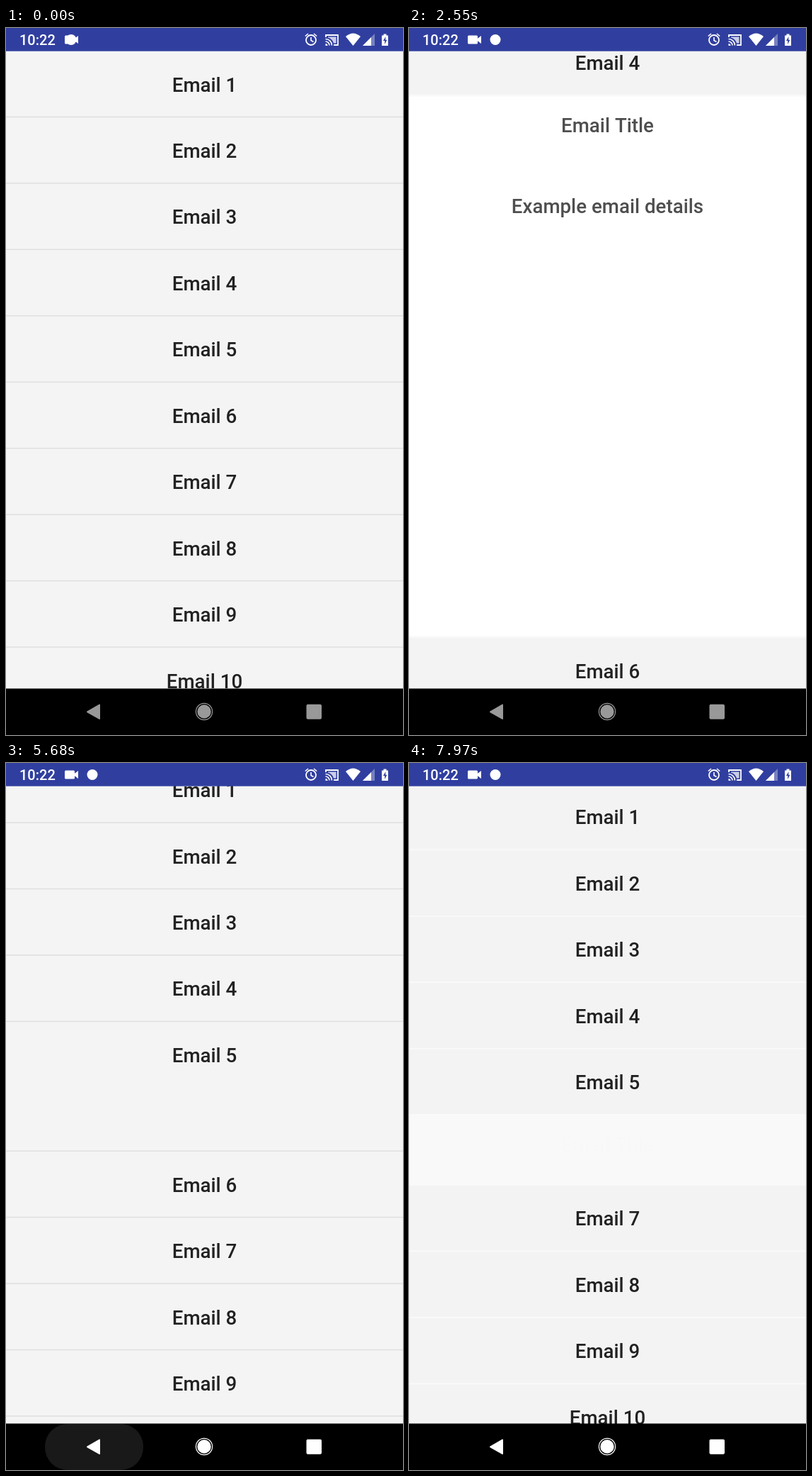
An HTML page with a canvas that plays this animation: 561 px wide and 997 px high, repeating every 8000 ms.

```html
<!DOCTYPE html>
<html lang="en">
<head>
<meta charset="utf-8">
<title>Expanding email list</title>
<style>
html, body { margin: 0; width: 100%; height: 100%; overflow: hidden; background: #000; }
canvas { display: block; }
</style>
</head>
<body>
<canvas id="stage" width="561" height="997"></canvas>
<script>
const ctx = document.getElementById('stage').getContext('2d');
const W = 561, H = 997, TOP = 32, BOTTOM = 932, NAV = 931.5, ROW = 93.45;
const LOOP = 8000, MOVE = 1640, OPEN_1 = 1648, CLOSE = 4668, OPEN_2 = 7883;
const FONT = 'Roboto, "Noto Sans", sans-serif';

const clamp = v => Math.max(0, Math.min(1, v));
const span = (t, from, to) => clamp((t - from) / (to - from));
const gray = v => `rgb(${v},${v},${v})`;

// cubic-bezier(.4, 0, .2, 1)
function ease(x) {
  if (x <= 0 || x >= 1) return clamp(x);
  let lo = 0, hi = 1, s;
  for (let i = 0; i < 24; i++) {
    s = (lo + hi) / 2;
    const bx = 1.2 * s * (1 - s) ** 2 + 0.6 * s * s * (1 - s) + s ** 3;
    if (bx < x) lo = s; else hi = s;
  }
  return s * s * (3 - 2 * s);
}

function rect(x, y, w, h, color) {
  ctx.fillStyle = color;
  ctx.fillRect(x, y, w, h);
}

function shape(d, color, stroke) {
  const path = new Path2D(d);
  if (stroke) {
    ctx.strokeStyle = color;
    ctx.lineWidth = stroke;
    ctx.stroke(path);
  } else {
    ctx.fillStyle = color;
    ctx.fill(path);
  }
}

function circle(x, y, r, color, stroke) {
  ctx.beginPath();
  ctx.arc(x, y, r, 0, 7);
  ctx.fillStyle = ctx.strokeStyle = color;
  ctx.lineWidth = stroke || 0;
  stroke ? ctx.stroke() : ctx.fill();
}

function pill(x, y, w, h, r, color) {
  ctx.beginPath();
  ctx.roundRect(x, y, w, h, r);
  ctx.fillStyle = color;
  ctx.fill();
}

function label(text, y, alpha = 1) {
  ctx.font = `500 27.7px ${FONT}`;
  ctx.textAlign = 'center';
  ctx.fillStyle = `rgba(33,33,33,${alpha})`;
  ctx.fillText(text, W / 2, y);
}

// Which row is open, how far, and in which direction
function stateAt(t) {
  if (t >= OPEN_2) return opening(t - OPEN_2, 5);
  if (t >= CLOSE + MOVE || t < OPEN_1) return { open: -1, p: 0 };
  if (t < CLOSE) return opening(t - OPEN_1, 4);
  return { open: 4, p: 1 - ease((t - CLOSE) / MOVE), closing: true, cover: span(t, CLOSE, CLOSE + 270) };
}

// The page trails the rows slightly
function opening(dt, open) {
  return { open, p: ease(dt / MOVE), page: ease((dt - 7) / MOVE), expanding: true };
}

function drawPage(top, bottom, fill, ink) {
  ctx.save();
  ctx.beginPath();
  ctx.rect(0, top, W, bottom - top);
  ctx.clip();
  rect(0, top, W, bottom - top, `rgba(255,255,255,${fill})`);
  label('Email Title', top + 51, ink);
  label('Example email details', top + 164.4, ink);
  ctx.restore();
}

function drawList(t) {
  const { open, p, page, expanding, closing, cover } = stateAt(t);
  const openTop = TOP + ROW * open, openEnd = openTop + ROW;
  const up = q => (TOP - openTop) * q;
  const down = q => (BOTTOM - openEnd) * q;

  ctx.save();
  ctx.beginPath();
  ctx.rect(0, TOP, W, BOTTOM - TOP);
  ctx.clip();
  rect(0, TOP, W, BOTTOM - TOP, expanding ? '#f9f9f9' : '#f4f4f4');

  for (let i = 0; i < 10; i++) {
    const shift = open < 0 ? 0 : i <= open ? up(p) : down(p);
    const y = TOP + ROW * i + shift;
    if (expanding) {
      if (i === open) continue;
      rect(0, y + 1, W, ROW - 2, '#f3f3f3');
      label('Email ' + (i + 1), y + 57.5);
      continue;
    }
    if (closing && i === open) {
      const end = openEnd + down(p);
      drawPage(y, end, 1, 1);
      ctx.globalAlpha = cover;
      rect(0, y, W, end - y, '#f4f4f4');
    }
    label('Email ' + (i + 1), y + 57.5);
    ctx.globalAlpha = 1;
    if (i) {
      const edge = closing && (i === open || i === open + 1);
      ctx.globalAlpha = edge ? clamp((0.74 - p) * 3) : 1;
      rect(0, y - 0.7, W, 1.4, '#dedede');
      ctx.globalAlpha = 1;
    }
  }
  if (expanding) {
    drawPage(openTop + up(page), openEnd + down(page), clamp(page * 5), page ** 1.2);
  }
  ctx.restore();
}

function drawStatus(t) {
  rect(0, 0, W, 32.7, '#303f9f');
  ctx.font = `500 20px ${FONT}`;
  ctx.textAlign = 'left';
  ctx.fillStyle = '#fff';
  ctx.fillText('10:22', 19, 24);

  // Recorder, with a second notification sliding out from it
  pill(83, 10.5, 14, 12, 1.5, '#fff');
  shape('M96 15.5L102 11V22L96 17.5Z', '#fff');
  circle(92 + 30 * ease(span(t, 60, 860)), 16.5, 7.5, '#fff');

  // Alarm
  circle(431, 17, 7, '#fff', 1.8);
  shape('M431 13V17.5L434.5 19.5M422.8 11.5L427 8M439.2 11.5L435 8', '#fff', 1.6);

  // Cast
  shape('M452 13V10H469V24H463', '#fff', 1.8);
  shape('M451.5 15.5A9 9 0 0 1 460.5 24.5M451.5 19A5.5 5.5 0 0 1 457 24.5', '#fff', 1.6);
  shape('M451.5 22A3 3 0 0 1 454.5 25H451.5Z', '#fff');
  shape('M455 12.5H466.5V21.5H463Q461 15 455 13.5Z', 'rgba(255,255,255,.75)');

  // Wi-Fi, signal and battery
  shape('M480 12Q490.5 3 501 12L490.5 25Z', '#fff');
  shape('M504 25L521 8V25Z', 'rgba(255,255,255,.35)');
  shape('M504 25L516 13V25Z', '#fff');
  shape('M531 10.5H533.5V8.5H537.5V10.5H540V25H531Z', '#fff');
  shape('M536.5 12L533 18H535.2V23L538.3 16.8H536.2Z', '#303f9f');
}

function drawNav(t) {
  rect(0, NAV, W, H - NAV, '#000');

  // Ripple behind the back button
  if (t > 4560 && t < 6400) {
    const grow = 1 - (1 - span(t, 4560, 5400)) ** 2;
    const half = 32.5 + 37 * grow;
    const level = 28 * span(t, 4560, 4800) * (1 - span(t, 5600, 6400));
    pill(124.5 - half, BOTTOM, half * 2, H - BOTTOM, 32, gray(level));
  }

  const color = gray(153 + 102 * span(t, 4715, 5615));
  shape('M115 963.2L131.5 953.8Q133 953 133 954.8V973.7Q133 975.5 131.5 974.7L115 965.4Q113 964.3 115 963.2Z', color);
  circle(280, 964, 9.7, color);
  circle(280, 964, 11.6, color, 1.2);
  pill(424.5, 953.8, 21.5, 21, 2, color);

  // Finger on the back button
  if (t >= 3270 && t < 4590) {
    const glow = ctx.createRadialGradient(121.5, 990, 0, 121.5, 990, 17);
    glow.addColorStop(0, '#dedee2');
    glow.addColorStop(0.55, '#ceced2');
    glow.addColorStop(0.76, '#a9a9b0');
    glow.addColorStop(0.84, '#4a4a58');
    glow.addColorStop(1, 'rgba(30,30,45,0)');
    circle(121.5, 990, 17, glow);
  }
}

function frame() {
  const t = performance.now() % LOOP;
  drawList(t);
  drawStatus(t);
  drawNav(t);
  requestAnimationFrame(frame);
}
frame();
</script>
</body>
</html>
```
